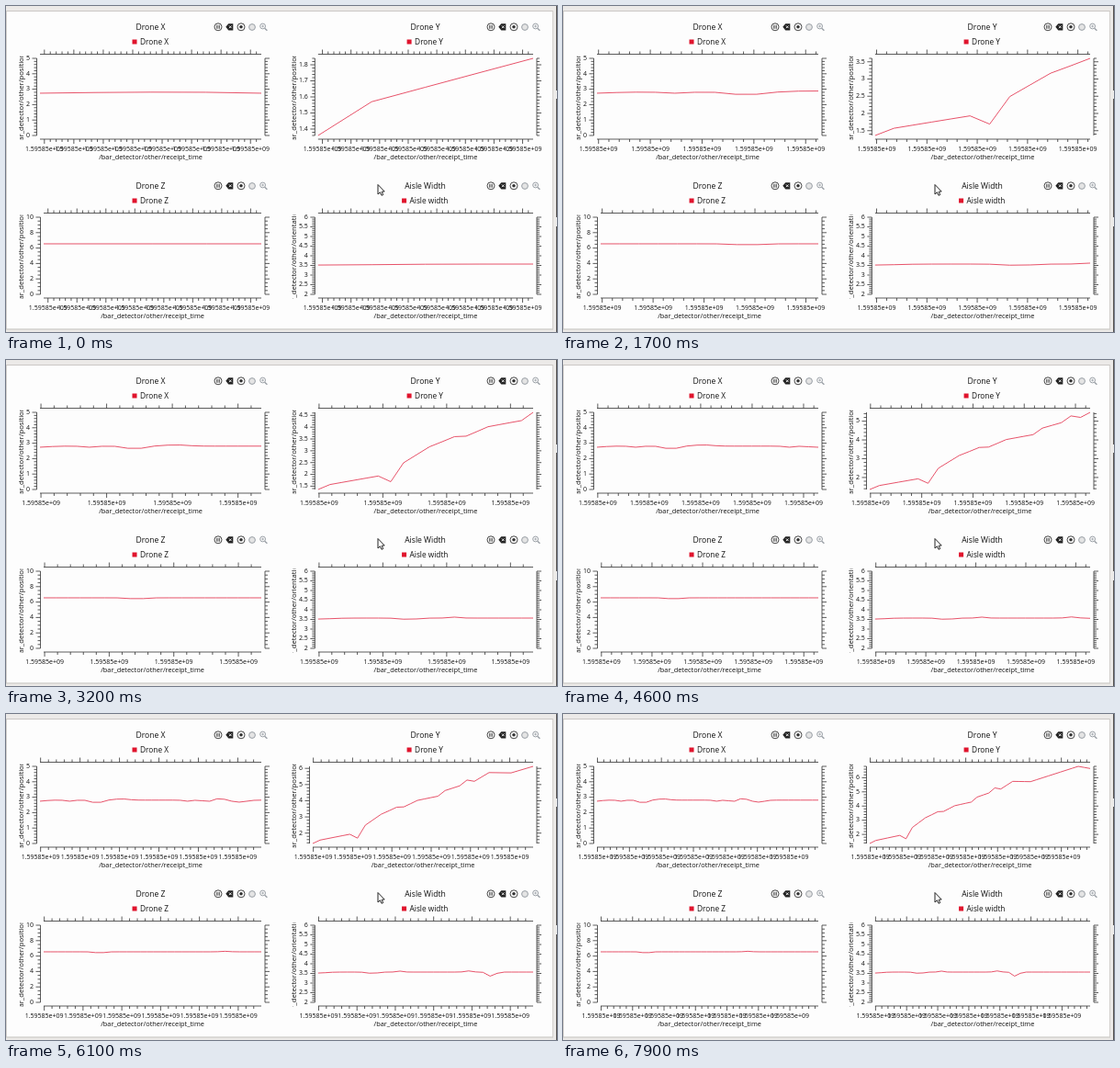
Recreate the animation shown at these times as an HTML page with a canvas. Size 600 px wide and 355 px high, loop 8000 ms.

```html
<!DOCTYPE html>
<html lang="en">
<head>
<meta charset="utf-8">
<title>Drone plots</title>
<style>
  html, body { margin: 0; width: 100%; height: 100%; overflow: hidden; background: #fdfdfd; }
  canvas { display: block; width: 600px; height: 355px; }
</style>
</head>
<body>
<canvas id="stage" width="600" height="355"></canvas>
<script>
const ctx = document.getElementById('stage').getContext('2d');
const FONT = '"Open Sans", "Noto Sans", sans-serif';
const INK = '#111', AXIS = '#333', RED = '#e0142d', GREY = '#9aa0a6';
const LOOP = 8000, LAST = 37;

// A steady reading with soft bumps: [sample, height, width].
const bumpy = (base, bumps) => k =>
  bumps.reduce((v, [at, h, w]) => v + h * Math.exp(-(((k - at) / w) ** 2)), base);

// Straight runs between key points: [sample, value].
const through = points => k => {
  const i = Math.max(1, points.findIndex(p => p[0] >= k));
  const [[k0, v0], [k1, v1]] = [points[i - 1], points[i]];
  return v0 + (v1 - v0) * (k - k0) / (k1 - k0);
};

const droneX = bumpy(2.81, [[0, -0.07, 1], [4, -0.07, 0.7], [7.5, -0.19, 0.9],
  [10.6, 0.08, 1.3], [20, -0.07, 0.7], [22.7, -0.09, 0.8], [24.4, 0.12, 0.8], [27, -0.13, 1.3]]);
const droneY = through([[0, 1.36], [1, 1.57], [5, 1.93], [6, 1.69], [7, 2.49], [9, 3.17],
  [11, 3.6], [12, 3.62], [14, 4.02], [17, 4.28], [18, 4.63], [20, 4.92], [21, 5.28],
  [22, 5.2], [24, 5.74], [27, 5.72], [35, 6.8], [LAST, 6.65]]);
const droneZ = bumpy(6.55, [[7.5, -0.15, 0.8], [25, 0.07, 0.8]]);
const aisle = bumpy(3.57, [[0, -0.05, 1.5], [7.4, -0.07, 0.9], [11, 0.05, 0.6],
  [21, 0.06, 0.7], [24.2, -0.23, 0.7]]);

const COLS = [
  { left: 33, right: 278, mid: 157.5, nameX: 16.5, icons: 231 },
  { left: 330, right: 574, mid: 456.5, nameX: 314, icons: 528 },
];
const charts = [
  { title: 'Drone X', read: droneX, range: [0, 5], step: 1, name: 'position/x' },
  { title: 'Drone Y', read: droneY, name: 'position/y' },
  { title: 'Drone Z', read: droneZ, range: [0, 10], step: 2, name: 'position/z' },
  { title: 'Aisle Width', read: aisle, range: [2, 6], step: 0.5, name: 'orientation/x' },
].map((c, i) => ({ ...COLS[i % 2], ...c, dy: i < 2 ? 0 : 173 }));

// Samples arrive a little unevenly near the sudden climb.
const sampleTime = k => k && 0.187 * k + 0.08 * Math.exp(-(((k - 11) / 4) ** 2));
const TICK_SHIFT = 0.015;

function niceStep(v) {
  const p = 10 ** Math.floor(Math.log10(v));
  return p * [1, 2, 5, 10].find(m => m * p >= v);
}

const timeStep = span => span < 0.8 ? 0.1 : span < 1.6 ? 0.2 : span < 2.6 ? 0.5 : 1;

// Major and minor tick values inside [lo, hi].
function ticks(lo, hi, step, origin = 0) {
  const lead = Math.round(step / 10 ** Math.floor(Math.log10(step) + 1e-9));
  const sub = lead === 2 ? 4 : 5, d = step / sub, e = d * 1e-6;
  const list = [];
  for (let i = Math.ceil((lo - origin - e) / d); i * d + origin <= hi + e; i++)
    list.push({ v: i * d + origin, major: i % sub === 0 });
  return list;
}

const label = v => String(+v.toFixed(2));

function textWidth(s, size) {
  ctx.font = `${size}px ${FONT}`;
  return ctx.measureText(s).width;
}

function text(s, x, y, size, align = 'center') {
  ctx.font = `${size}px ${FONT}`;
  ctx.textAlign = align;
  ctx.fillStyle = INK;
  ctx.fillText(s, x, y);
}

function rect(x, y, w, h, color) {
  ctx.fillStyle = color;
  ctx.fillRect(x, y, w, h);
}

function trace(points) {
  ctx.beginPath();
  points.forEach(p => ctx.lineTo(...p));
}

function stroke(color, width) {
  ctx.strokeStyle = color;
  ctx.lineWidth = width;
  ctx.stroke();
}

function fill(color) {
  ctx.fillStyle = color;
  ctx.fill();
}

function path(points, color, width) {
  trace(points);
  stroke(color, width);
}

function circle(x, y, r) {
  ctx.beginPath();
  ctx.arc(x, y, r, 0, 2 * Math.PI);
}

function icons(x, y) {
  ctx.save();
  ctx.translate(x, y);
  circle(0, 0, 4);
  stroke(AXIS, 0.9);
  rect(-1.7, -2, 1.1, 4, AXIS);
  rect(0.6, -2, 1.1, 4, AXIS);

  ctx.translate(12.5, 0);
  trace([[-4.2, 0], [-1.2, -3.6], [3.8, -3.6], [3.8, 3.6], [-1.2, 3.6]]);
  fill('#222');
  for (const s of [-1, 1]) path([[-0.6, -1.4 * s], [2.2, 1.4 * s]], '#fff', 0.9);

  ctx.translate(12.5, 0);
  circle(0, 0, 4);
  stroke(AXIS, 0.9);
  circle(0, 0, 1.8);
  fill(AXIS);

  ctx.translate(12, 0);
  circle(0, 0.2, 3.4);
  fill('#e4e4e4');
  stroke(GREY, 1);

  ctx.translate(11.6, -0.8);
  circle(0, 0, 2.9);
  stroke(GREY, 1);
  path([[2.1, 2.2], [4.8, 4.8]], GREY, 1.4);
  path([[-1.4, 0], [1.4, 0]], GREY, 0.8);
  path([[0, -1.4], [0, 1.4]], GREY, 0.8);
  ctx.restore();
}

function drawHeading(c) {
  const legend = c.title.replace('Width', 'width');
  const w = textWidth(legend, 8.3);
  text(c.title, c.mid, 26, 8.6);
  text(legend, c.mid + 4, 41.7, 8.3);
  rect(c.mid - w / 2 - 4.5, 36.5, 5, 5, RED);
  icons(c.icons, 22.8);
}

function drawChart(c, last) {
  const bottom = 141, top = 57, mid = 99.5;
  const values = Array.from({ length: last + 1 }, (_, k) => c.read(k));
  const [lo, hi] = c.range || [Math.min(...values), Math.max(...values)];
  const yStep = c.step || niceStep((hi - lo) / 8);
  const yTicks = ticks(lo, hi, yStep);

  // The widest value label sets the left edge.
  const left = c.left + Math.max(...yTicks.filter(t => t.major).map(t => textWidth(label(t.v), 7)));

  // The plot narrows when the last time label would stick out.
  const span = sampleTime(last);
  const xTicks = ticks(0, span, timeStep(span), TICK_SHIFT);
  const lastTick = xTicks.filter(t => t.major).pop().v;
  const right = Math.min(c.right, left + (c.right - 11 - left) * span / lastTick);
  const px = t => left + (right - left) * t / span;
  const py = v => bottom - (bottom - top) * (v - lo) / (hi - lo);

  ctx.save();
  ctx.translate(0, c.dy);
  drawHeading(c);

  const axis = (...p) => path(p, AXIS, 0.8);
  const xTop = 52.5, xBase = 145, yLeft = left - 3.5, yRight = c.right + 4;
  axis([left, xTop], [right, xTop]);
  axis([left, xBase], [right, xBase]);
  xTicks.forEach(({ v, major }) => {
    const x = px(v), n = major ? 5 : 3;
    axis([x, xTop], [x, xTop - n]);
    axis([x, xBase], [x, xBase + n]);
    if (major) text('1.59585e+09', x, 157.5, 7);
  });

  axis([yLeft, top], [yLeft, bottom]);
  axis([yRight, top], [yRight, bottom]);
  yTicks.forEach(({ v, major }) => {
    const y = py(v), n = major ? 5 : 3;
    axis([yLeft, y], [yLeft - n, y]);
    axis([yRight, y], [yRight + n, y]);
    if (major) text(label(v), yLeft - 7.5, y + 1.8, 7, 'right');
  });

  text('/bar_detector/other/receipt_time', (left + right) / 2, 166.5, 7.35);

  ctx.save();
  ctx.beginPath();
  ctx.rect(c.nameX - 8, mid - 45, 16, 91);
  ctx.clip();
  ctx.translate(c.nameX, mid);
  ctx.rotate(-Math.PI / 2);
  text('/bar_detector/other/' + c.name, 0, 2.2, 7.7);
  ctx.restore();

  path(values.map((v, k) => [px(sampleTime(k)), py(v)]), '#e5405a', 0.9);
  ctx.restore();
}

function drawWindow() {
  rect(0, 0, 600, 355, '#eceae8');
  rect(1, 6, 594, 345.5, '#fdfdfd');
  rect(0, 5, 595, 1, '#cbc8c5');
  rect(0, 6, 1, 346, '#d2cfcc');
  rect(0, 351.5, 596, 1, '#c8c5c2');
  rect(595, 5, 1, 347, '#d2cfcc');
  rect(599, 0, 1, 355, '#55524f');
  rect(599, 92, 1, 9, '#eee');
  rect(599, 230, 1, 10, '#eee');
}

function drawCursor(x, y) {
  trace([[0, 0], [0, 10.5], [2.4, 8.3], [4, 11.8], [5.7, 11], [4.2, 7.7], [7.2, 7.5]]
    .map(([a, b]) => [x + a, y + b]));
  ctx.closePath();
  fill('#fff');
  stroke('#222', 1);
}

function draw() {
  const t = performance.now() % LOOP / 1000;
  const last = Math.min(LAST, Math.floor(4.6 + 4.2 * t));
  drawWindow();
  charts.forEach(c => drawChart(c, last));
  drawCursor(405, 194.5);
  requestAnimationFrame(draw);
}
draw();
</script>
</body>
</html>
```
